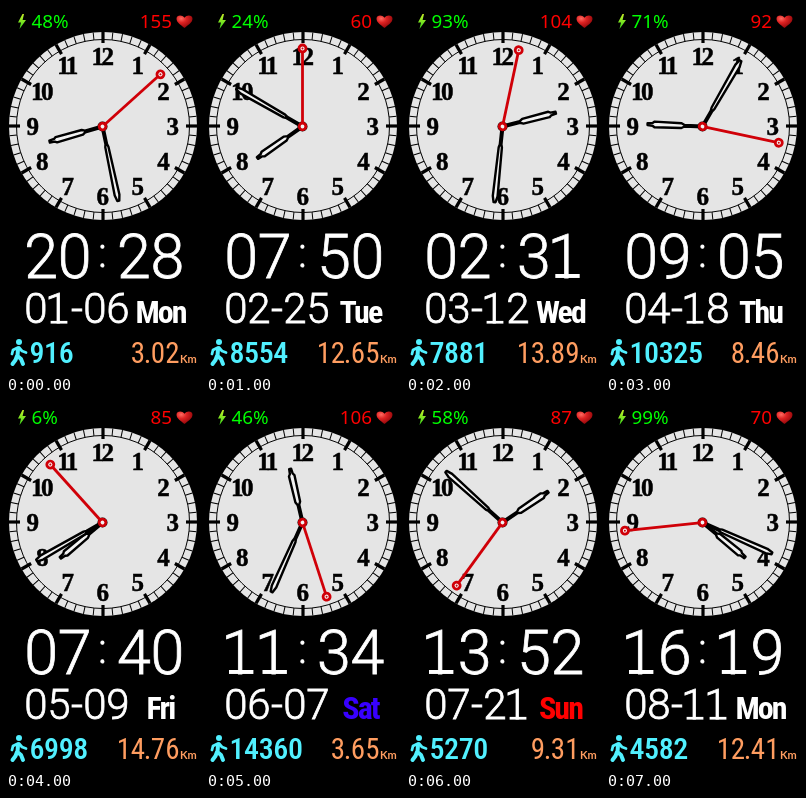
Write an HTML page that moves like this. It is 194 by 368 pixels and loops after 8000 ms.

```html
<!DOCTYPE html>
<html lang="en">
<head>
<meta charset="utf-8">
<title>Watch face</title>
<style>
  html, body { margin: 0; width: 100%; height: 100%; overflow: hidden; background: #000; }
  svg { display: block; width: 194px; height: 368px; }
  .top { font: 500 18.8px "Noto Sans", "Open Sans", sans-serif; }
  .num { font: 700 25px "Liberation Serif", "Noto Serif", serif; letter-spacing: -2.6px;
         fill: #000; stroke-width: .5px; }
  .thin { font-family: Roboto, Inter, sans-serif; font-weight: 300; fill: #fff; stroke: #fff; stroke-width: .8px; }
  .day { font: 600 32px "Roboto Condensed", "Liberation Sans Narrow", "Open Sans Condensed", Roboto, sans-serif;
         font-stretch: 75%; letter-spacing: -1.9px; }
  .steps, .dist { font: 500 30px "Roboto Condensed", Roboto, sans-serif; font-stretch: 75%; fill: #51f0ff; }
  .dist { font-weight: 400; font-size: 29px; fill: #ff9d60; }
  .unit { font: 700 11px Lato, sans-serif; fill: #ff9d60; }
  .mid { text-anchor: middle; }
</style>
</head>
<body>
<svg viewBox="0 0 194 368">
  <defs>
    <linearGradient id="volt" x2="0" y2="1">
      <stop offset="0" stop-color="#c8f02a"/><stop offset="1" stop-color="#35d91b"/>
    </linearGradient>
    <radialGradient id="blood" cx=".3" cy=".25" r=".8">
      <stop offset="0" stop-color="#ff6c62"/><stop offset=".4" stop-color="#df2323"/><stop offset="1" stop-color="#8c0508"/>
    </radialGradient>
  </defs>

  <path fill="url(#volt)" d="M16.5 8L12 16.5H15L13.5 23L20 14H16.6L18 8Z"/>
  <text id="battery" class="top" x="25.5" y="21.7" fill="#0f0"/>
  <text id="pulse" class="top" x="166" y="21.7" fill="#f00" text-anchor="end"/>
  <path fill="url(#blood)" d="M178.5 22C175 19 170.5 16.5 170.5 12.7C170.5 9 176 8.2 178.5 11.8C181 8.2 186.5 9 186.5 12.7C186.5 16.5 182 19 178.5 22Z"/>

  <circle cx="97" cy="120" r="94" fill="#e5e5e5"/>
  <g id="dial" transform="translate(97 120)" stroke="#000">
    <circle r="86.5" fill="none"/>
  </g>

  <g transform="translate(96.5 120.5)">
    <g fill="#f2f2f2" stroke="#000" stroke-width="2.4" stroke-linejoin="round">
      <path id="hour" d="M-.8 0V-18L-2.4 -21L-2.8 -48L-1.4 -50L-1 -55H1L1.4 -50L2.8 -48L2.4 -21L.8 -18V0"/>
      <path id="minute" d="M-.8 0V-18L-1.6 -21L-2.4 -70L-1 -76H1L2.4 -70L1.6 -21L.8 -18V0"/>
    </g>
    <circle r="5" fill="#000"/>
    <g id="second" fill="#f2f2f2" stroke="#d00008" stroke-width="2.8">
      <path d="M0 -3V-75"/>
      <circle r="3.3"/>
      <circle cy="-78" r="3.5"/>
      <circle cy="-78" r="1" fill="#d00008" stroke="none"/>
    </g>
  </g>

  <g id="time" class="thin mid" font-size="61"></g>
  <g id="date" class="thin mid" font-size="42"></g>
  <text id="day" class="day mid" x="154.5" y="317"/>

  <g fill="none" stroke="#51f0ff" stroke-width="4" stroke-linecap="round" stroke-linejoin="round">
    <circle cx="13" cy="336" r="3" fill="#51f0ff" stroke="none"/>
    <path d="M12 343L11.5 350L15 353L17 358M11 350L9.5 354L6.5 358"/>
    <path stroke-width="2.8" d="M12 341.5L7 344L6 348M13 341.5L16 345L20 346.5"/>
  </g>
  <g id="steps" class="steps mid"></g>
  <g id="dist" class="dist mid"></g>
  <text class="unit" x="174" y="356.5">Km</text>
</svg>
<script>
const $ = id => document.getElementById(id);

function add(parent, tag, attrs, text = "") {
  const el = document.createElementNS("http://www.w3.org/2000/svg", tag);
  for (const key in attrs) el.setAttribute(key, attrs[key]);
  el.textContent = text;
  return parent.appendChild(el);
}

// time, date, weekday, battery, pulse, steps, kilometres
const readings = [
  ["20:28:08", "01-06", "Mon", 48, 155, 916, "3.02"],
  ["07:50:00", "02-25", "Tue", 24, 60, 8554, "12.65"],
  ["02:31:02", "03-12", "Wed", 93, 104, 7881, "13.89"],
  ["09:05:17", "04-18", "Thu", 71, 92, 10325, "8.46"],
  ["07:40:53", "05-09", "Fri", 6, 85, 6998, "14.76"],
  ["11:34:27", "06-07", "Sat", 46, 106, 14360, "3.65"],
  ["13:52:36", "07-21", "Sun", 58, 87, 5270, "9.31"],
  ["16:19:44", "08-11", "Mon", 99, 70, 4582, "12.41"]
];
const dayColor = { Sat: "#3800ff", Sun: "#f00" };

for (let i = 0; i < 60; i++) {
  const major = i % 5 === 0;
  add($("dial"), "path", {
    d: `M0 ${major ? -83 : -86.5}V-94`,
    "stroke-width": major ? 3.2 : 1,
    transform: `rotate(${i * 6})`
  });
}
for (let n = 1; n <= 12; n++) {
  const a = n * Math.PI / 6;
  add($("dial"), "text", {
    class: "num mid",
    x: 70 * Math.sin(a) - 1.5, y: 8.7 - 70 * Math.cos(a)
  }, n);
}

// Sets each character on its own cell centre.
function setCells(id, text, cells, y) {
  const box = $(id);
  box.replaceChildren();
  [...text].forEach((ch, i) => add(box, "text", { x: cells[i], y }, ch));
}

// Thin numerals, whose "1" stands on a foot.
function setThin(id, text, cells, y, size) {
  const box = $(id);
  setCells(id, text, cells, y);
  [...text].forEach((ch, i) => {
    if (ch === "1") {
      box.children[i].setAttribute("x", cells[i] - size * 0.05);
      add(box, "path", {
        d: `M${cells[i] - size * 0.2} ${y - size * 0.025}h${size * 0.4}`,
        "style": `stroke-width: ${size * 0.065}px`
      });
    } else if (ch === ":") {
      box.children[i].setAttribute("font-size", 40);
      box.children[i].setAttribute("y", y - 11);
    }
  });
}

const turn = (id, deg) => $(id).setAttribute("transform", `rotate(${deg})`);

function show([time, date, day, battery, pulse, steps, km]) {
  const [h, m, s] = time.split(":").map(Number);
  turn("hour", h * 30 + m / 2);
  turn("minute", m * 6);
  turn("second", s * 6);
  setThin("time", time.slice(0, 5), [35.2, 68.7, 96.5, 128, 161.5], 271.5, 61);
  setThin("date", date, [30, 53, 71, 89, 112], 317.3, 42);
  $("day").textContent = day;
  $("day").style.fill = dayColor[day] || "#fff";
  $("battery").textContent = battery + "%";
  $("pulse").textContent = pulse;
  setCells("steps", String(steps), [31, 45.6, 60.2, 74.8, 89.4], 357);
  setCells("dist", km, [118, 132, 141.5, 152, 166.3].slice(5 - km.length), 356.5);
}

let current = -1;
function tick() {
  const step = Math.floor(performance.now() / 1000) % readings.length;
  if (step !== current) show(readings[current = step]);
  requestAnimationFrame(tick);
}
tick();
</script>
</body>
</html>
```
